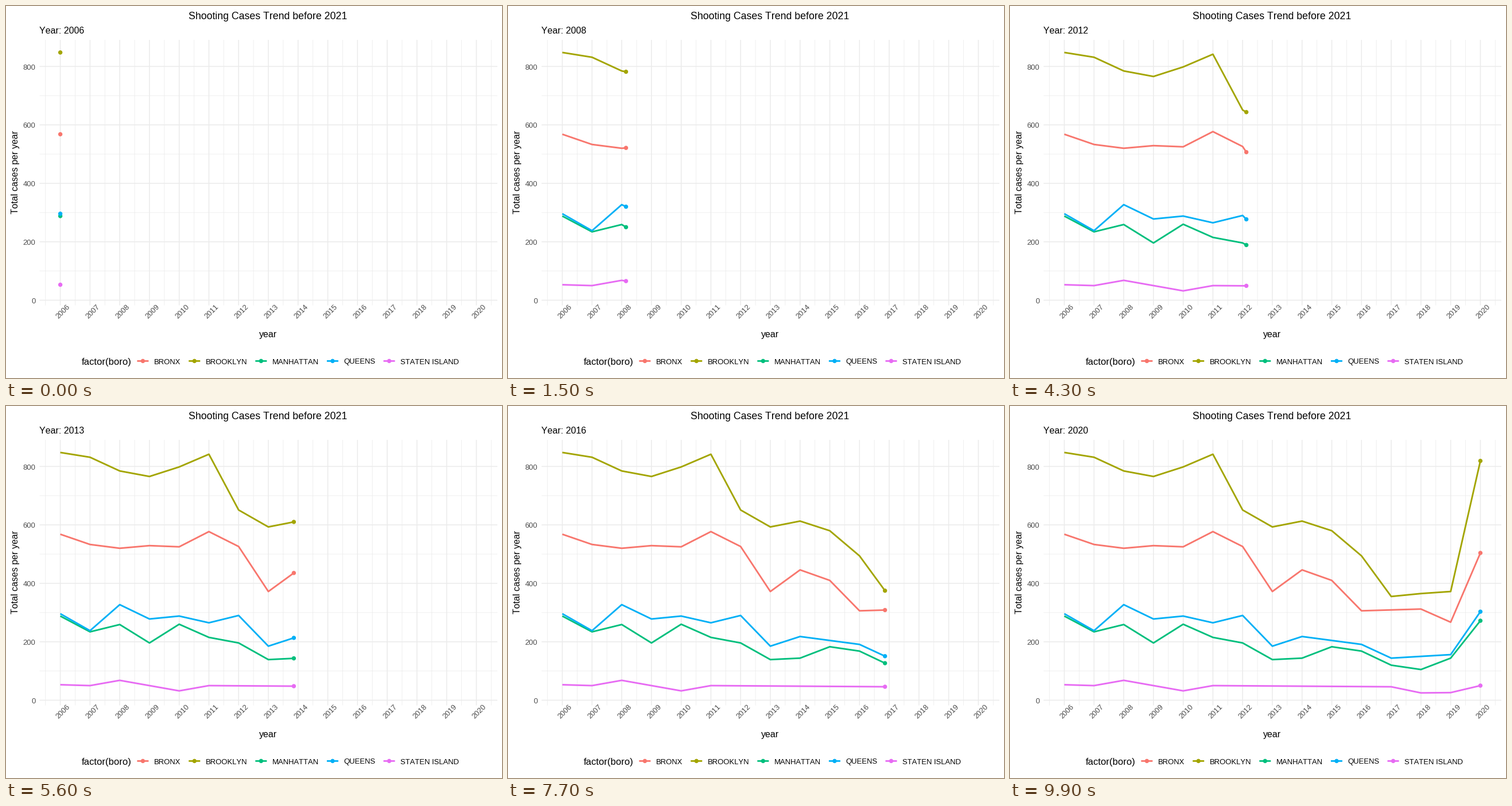
A matplotlib script for the animation above (10 s loop, 864 by 648 pixels).

```python
import numpy as np
import matplotlib.pyplot as plt
from matplotlib.animation import FuncAnimation
from matplotlib.patches import Circle

plt.rcParams.update({
    "font.family": "Liberation Sans",
    "text.kerning_factor": 6,  # practically no kerning
    "path.snap": False,
})

W, H, DPI = 864, 648, 96
FRAMES, INTERVAL = 100, 100
PT = 72 / DPI  # points per pixel

LEFT, RIGHT, TOP, BOTTOM = 58.5, 856, 59, 521.5
FIRST, STEP = 94.6, 51.77
ZERO, UNIT = 512.5, 0.509
GRID, TICK = "#EBEBEB", "#4D4D4D"
SMALL, MEDIUM, LARGE = 13, 16, 17.8

START, COUNT = 2006, 15
YEARS = np.arange(COUNT)
# Each year is reached on a whole tick of the animation
STOPS = np.round(YEARS * (FRAMES - 1) / (COUNT - 1))


def wave(mid, amp, peak, period, n):
    return mid + amp * np.cos(2 * np.pi * (np.arange(n) - peak) / period)


def arc(start, step, change, n):
    """n values whose step grows by a constant change."""
    k = np.arange(n)
    return start + step * k + change * k * (k - 1) / 2


ramp = np.linspace

# name: colour, cases per year
BOROS = {
    "BRONX": ("#F8766D", np.r_[arc(568, -35, 22, 4), arc(525, 52, -103, 4),
                               446, 410, ramp(306, 312, 3), 267, 504]),
    "BROOKLYN": ("#A3A500", np.r_[wave(807, 42, 0.2, 5.3, 6), 651,
                                  arc(593, 20, -53, 5), 365, 372, 819]),
    "MANHATTAN": ("#00BF7D", np.r_[288, 234, 259, 196, 260, 215, 196, 139,
                                   wave(144, 41, 1.25, 5, 6), 272]),
    "QUEENS": ("#00B0F6", np.r_[296, 238, 327, 278, 288, 265, 290, 185,
                                ramp(218, 191, 3), ramp(144, 156, 3), 303]),
    "STATEN ISLAND": ("#E76BF3", np.r_[53, wave(50, 18, 1, 4, 4),
                                       ramp(50, 46, 7), 25, 26, 50]),
}


def px(i):
    return FIRST + STEP * i


def py(v):
    return ZERO - UNIT * v


fig = plt.figure(figsize=(W / DPI, H / DPI), dpi=DPI, facecolor="white")
ax = fig.add_axes([0, 0, 1, 1])
ax.set(xlim=(0, W), ylim=(H, 0))
ax.axis("off")


def label(x, y, s, size, color="black", **kw):
    kw.setdefault("va", "baseline")
    return ax.text(x, y, s, fontsize=size * PT, color=color, **kw)


def grid(xs, ys, width):
    ax.vlines(xs, TOP, BOTTOM, colors=GRID, lw=width * PT, zorder=1)
    ax.hlines(ys, LEFT, RIGHT, colors=GRID, lw=width * PT, zorder=1)


def stroke(x, y, color):
    return ax.plot(x, y, color=color, lw=2.845 * PT, zorder=2,
                   solid_capstyle="butt", solid_joinstyle="round")[0]


def dot(x, y, color):
    return ax.add_patch(Circle((x, y), 3.7, fc=color, lw=0, zorder=3))


ticks = np.arange(0, 801, 200)
grid(px(np.arange(-0.5, COUNT)), py(ticks[:-1] + 100), 0.78)
grid(px(YEARS), py(ticks), 1.55)

for v in ticks:
    label(51.3, py(v) + 5.3, str(v), SMALL, TICK, ha="right")
for i in YEARS:
    label(px(i) + 5.4, 533, str(START + i), SMALL, TICK, rotation=45,
          ha="center", va="center")

label(456.5, 22.8, "Shooting Cases Trend before 2021", LARGE, ha="center")
subtitle = label(58.3, 48, "", MEDIUM)
label(457, 577.5, "year", MEDIUM, ha="center")
label(21.5, 289.7, "Total cases per year", MEDIUM, rotation=90,
      rotation_mode="anchor", ha="center")
label(132, 624.8, "factor(boro)", 16.6)

lines, heads = [], []
key = 238.4
for name, (color, cases) in BOROS.items():
    stroke([key - 10, key + 10], [618.4, 618.4], color)
    dot(key, 618.4, color)
    text = label(key + 19.8, 623.5, name, SMALL)
    key += text.get_window_extent().width + 43.6
    lines.append(stroke([], [], color))
    heads.append(dot(px(0), py(cases[0]), color))


def update(n):
    pos = np.interp(n, STOPS, YEARS)
    path = np.append(np.arange(int(pos) + 1), pos)
    for (_, cases), line, head in zip(BOROS.values(), lines, heads):
        x, y = px(path), py(np.interp(path, YEARS, cases))
        line.set_data(x, y)
        head.center = x[-1], y[-1]
    subtitle.set_text(f"Year: {START + (COUNT - 1) * n // (FRAMES - 1)}")
    return [*lines, *heads, subtitle]


anim = FuncAnimation(fig, update, frames=FRAMES, init_func=lambda: update(0),
                     interval=INTERVAL, repeat=True, repeat_delay=0)
plt.show()
```
